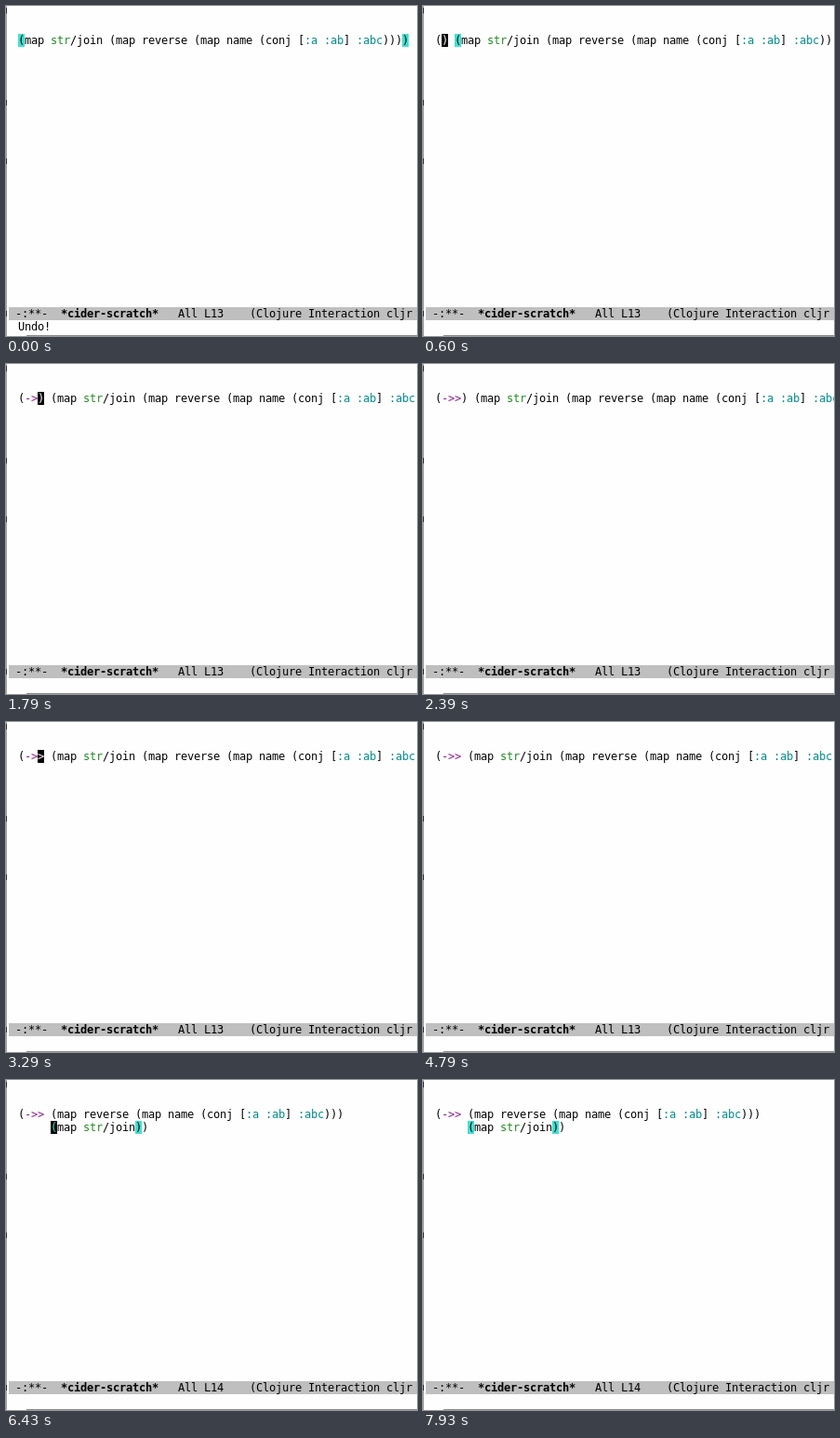
Recreate the animation shown at these times as an HTML page. Size 442 by 355 pixels, loop 8 s.

```html
<!DOCTYPE html>
<html lang="en">
<head>
<meta charset="utf-8">
<title>Threading a Clojure form</title>
<style>
  html, body { margin: 0; width: 100%; height: 100%; overflow: hidden; background: #fefefe; }
  #stage {
    position: absolute; left: 0; top: 0; width: 442px; height: 355px;
    overflow: hidden; background: #fefefe; color: #000;
    font: 12px/14px "DejaVu Sans Mono", monospace;
    font-variant-ligatures: none;
  }
  #stage div { position: absolute; white-space: pre; height: 14px; }
  #code, #echo { left: 13px; }
  #code { top: 30px; }
  #echo { top: 338px; }
  #mode { left: 3px; right: 0; top: 324px; background: #bfbfbf; }
  .cell { width: 7px; background: #40e0d0; }
  .cursor { background: #000; color: #fff; }
  .cursor.paired { color: #40e0d0; }
  .keyword { color: #008b8b; }
  .type { color: #228b22; }
  .macro { color: #8b1c8b; }
  #stage #edge { left: 0; top: 0; width: 1px; height: 355px; background: #a4a4a4; }
  #stage .tick { left: 0; width: 1px; height: 6px; background: #333; }
  #stage #floor { left: 22px; right: 0; top: 354px; height: 1px; background: #8c8c8c; }
</style>
</head>
<body>
<div id="stage">
  <div id="edge"></div>
  <div class="tick" style="top:2px"></div>
  <div class="tick" style="top:101px"></div>
  <div class="tick" style="top:164px"></div>
  <div class="tick" style="top:328px"></div>
  <div id="floor"></div>
  <div id="code"></div>
  <div id="mode"> -:**-  <b>*cider-scratch*</b>   All L<span id="line">13</span>    (Clojure Interaction cljr</div>
  <div id="echo"></div>
</div>
<script>
const LOOP = 8000, CELL = 7, ROW = 14;
const $ = id => document.getElementById(id);

const inner = "(map reverse (map name (conj [:a :ab] :abc)))";
const form = `(map str/join ${inner})`;
const slurped = `(->> ${form})`;
const threaded = `(->> ${inner}\n     (map str/join))`;

// point and pairs are [row, column]
const edits = [
  { at: 0, text: form, point: [0, 0], pairs: [[0, 0], [0, 59]], echo: "Undo!" },
  { at: 600, text: `() ${form}`, point: [0, 1], pairs: [[0, 3]] },
  { at: 750, text: `() ${form}`, point: [0, 1] },
  { at: 1050, text: `(-) ${form}`, point: [0, 2] },
  { at: 1790, text: `(->) ${form}`, point: [0, 3] },
  { at: 1940, text: `(->>) ${form}`, point: [0, 4] },
  { at: 2690, text: slurped, point: [0, 4], echo: "Indenting region...done" },
  { at: 3290, text: slurped, point: [0, 3] },
  { at: 6430, text: threaded, point: [1, 5], pairs: [[1, 5], [1, 18]], line: 14 }
];

// Each edit shows the cursor; each blink after it toggles it.
const blinks = [0, 300, 1640, 2390, 3140, 3740, 4190, 4790, 5240, 5690, 6280, 6880, 7330, 7930];

function highlight(text) {
  return text.replace(/(:\w+)|\b(str)\b|->+/g, (s, key, type) =>
    `<span class="${key ? "keyword" : type ? "type" : "macro"}">${s}</span>`);
}

function cell(text, [row, col], cls) {
  const char = text.split("\n")[row][col];
  return `<div class="cell ${cls}" style="left:${col * CELL}px;top:${row * ROW}px">${char}</div>`;
}

// Fit the font's advance to the terminal grid.
function fitGrid() {
  const ruler = $("echo");
  ruler.textContent = "0".repeat(100);
  const advance = ruler.getBoundingClientRect().width / 100;
  $("stage").style.letterSpacing = `${CELL - advance}px`;
}

let shown = "";
function draw(now) {
  const t = now % LOOP;
  const edit = edits.findLast(e => e.at <= t);
  const toggles = blinks.filter(b => b >= edit.at && b <= t).length;
  const key = `${edit.at}/${toggles}`;
  if (key !== shown) {
    shown = key;
    const { text, point, pairs = [], echo = "", line = 13 } = edit;
    let html = highlight(text) + pairs.map(p => cell(text, p, "")).join("");
    if (toggles % 2 === 0) {
      const paired = pairs.some(p => p.join() === point.join());
      html += cell(text, point, paired ? "cursor paired" : "cursor");
    }
    $("code").innerHTML = html;
    $("echo").textContent = echo;
    $("line").textContent = line;
  }
}

function tick() {
  draw(performance.now() - start);
  requestAnimationFrame(tick);
}

fitGrid();
const start = performance.now();
tick();
</script>
</body>
</html>
```
